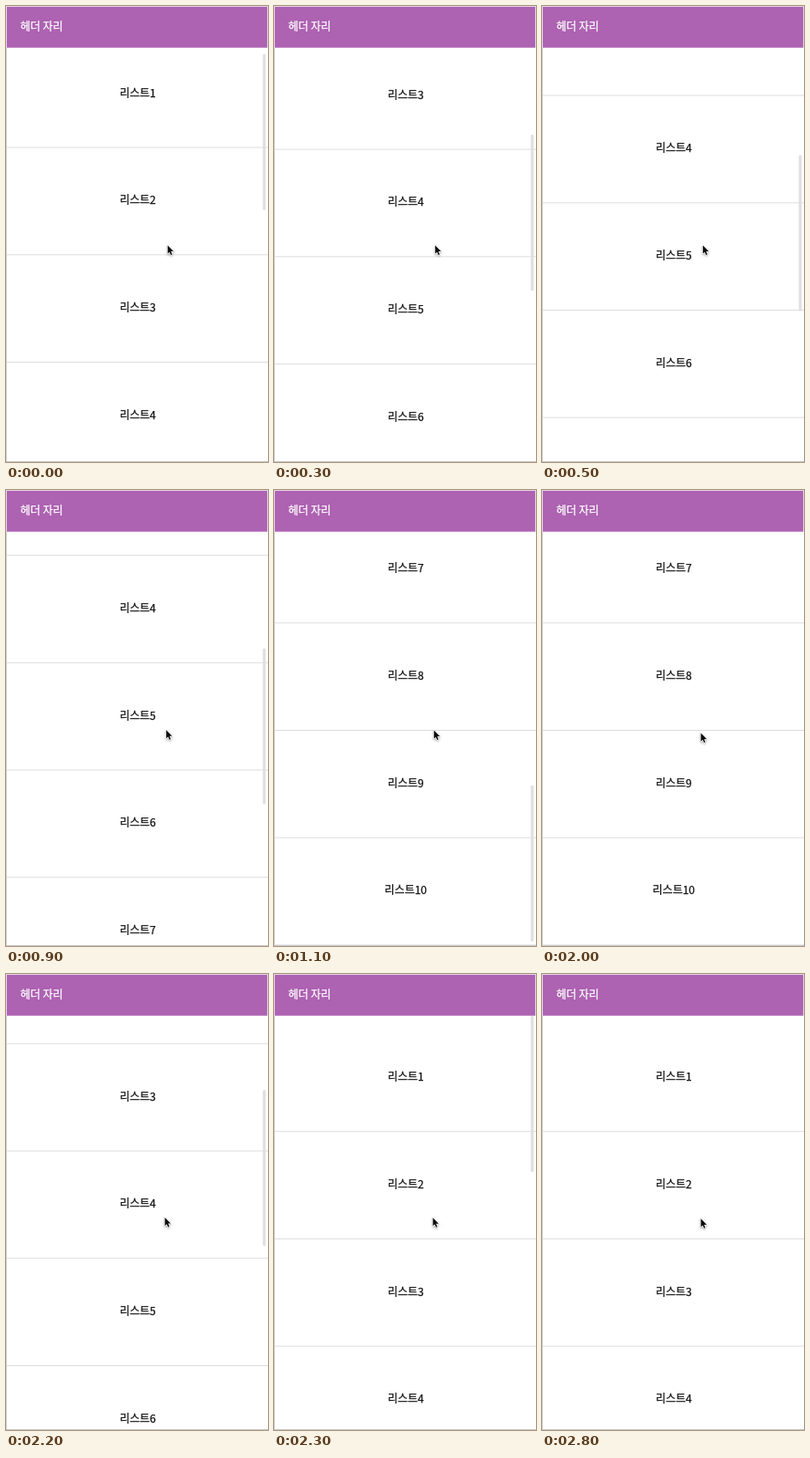
Animation of 288x500 px, one loop 4000 ms. Source, as an HTML page with a canvas:

```html
<!DOCTYPE html>
<html lang="ko">
<head>
<meta charset="utf-8">
<title>리스트 스크롤</title>
<style>
  html, body { margin: 0; width: 100%; height: 100%; overflow: hidden; background: #fff; }
  canvas { display: block; width: 288px; height: 500px; }
</style>
</head>
<body>
<canvas id="stage" width="288" height="500"></canvas>
<script>
const ctx = document.getElementById('stage').getContext('2d');
const LOOP = 4000, TICK = 100;
const WIDTH = 288, HEIGHT = 500, TOP = 46, ROW = 117.7, COUNT = 10;
const REST = 8.8, PAUSE = 304, END = 724.3;
const FONT = '500 12px "Noto Sans CJK KR", "Noto Sans CJK", "Noto Sans CJK JP", sans-serif';

// Fraction of the way from tick a to tick b.
const progress = (tick, a, b) => Math.min(1, Math.max(0, (tick - a) / (b - a)));
const glide = u => 1 - (1 - u ** 1.3) ** 3;

// A flick that glides out, a harder flick to the end, then a flick back up.
function scrollAt(tick) {
  return REST
    + (PAUSE - REST) * glide(progress(tick, 0, 6))
    + (END - PAUSE) * progress(tick, 7, 11) ** 4.15
    - END * progress(tick, 20, 23) ** 0.85
    - REST * progress(tick, 20, 23);
}

function barAlpha(tick) {
  return tick < 21 ? 1 - progress(tick, 15, 18) : 1 - progress(tick, 26, 28);
}

function cursorAt(tick) {
  return {
    x: 177.7 - 3.1 * progress(tick, 0, 18),
    y: 262.4 + 1.1 * progress(tick, 5, 11) + 3 * progress(tick, 13, 18)
      + 1.7 * progress(tick, 20, 28)
  };
}

function rect(color, x, y, w, h) {
  ctx.fillStyle = color;
  ctx.fillRect(x, y, w, h);
}

function text(label, x, y, color, align) {
  ctx.textAlign = align;
  ctx.fillStyle = ctx.strokeStyle = color;
  ctx.lineWidth = 0.25;
  ctx.fillText(label, x, y);
  ctx.strokeText(label, x, y);
}

function drawList(scroll) {
  for (let i = 0; i < COUNT; i++) {
    const y = TOP + i * ROW - scroll;
    rect('#dedede', 0, y + ROW - 0.3, WIDTH, 1);
    text('리스트' + (i + 1), 144.8, y + 62.4, '#111', 'center');
  }
}

function drawBar(scroll, alpha) {
  ctx.globalAlpha = alpha;
  ctx.fillStyle = '#dfdfdf';
  ctx.beginPath();
  ctx.roundRect(282.3, 49.2 + scroll * 0.379, 3.2, 171.3, 1.6);
  ctx.fill();
  ctx.globalAlpha = 1;
}

function drawHeader() {
  rect('#e6d5e8', 0, 0, WIDTH, TOP);
  rect('#ad62b2', 1, 1, WIDTH - 2, TOP - 1.4);
  text('헤더 자리', 15.7, 27.3, '#fff', 'left');
}

function drawCursor({ x, y }) {
  ctx.save();
  ctx.translate(x, y);
  ctx.scale(0.87, 0.87);
  ctx.beginPath();
  ctx.moveTo(0, 0);
  for (const [px, py] of [[0, 10.6], [2.4, 8.4], [4, 12.2], [5.7, 11.5], [4.1, 7.7], [7.4, 7.5]])
    ctx.lineTo(px, py);
  ctx.closePath();
  ctx.lineJoin = 'round';
  ctx.lineWidth = 1.4;
  ctx.strokeStyle = '#fff';
  ctx.shadowColor = 'rgba(0,0,0,0.4)';
  ctx.shadowBlur = 2.5;
  ctx.shadowOffsetY = 1;
  ctx.stroke();
  ctx.shadowColor = 'transparent';
  ctx.fillStyle = '#0c0c0c';
  ctx.fill();
  ctx.restore();
}

function draw(now) {
  const tick = Math.floor((now % LOOP) / TICK);
  const scroll = scrollAt(tick);
  ctx.font = FONT;
  rect('#fff', 0, 0, WIDTH, HEIGHT);
  drawList(scroll);
  drawBar(scroll, barAlpha(tick));
  rect('#d2d2d2', 0, TOP, 1, HEIGHT - TOP);
  rect('#cbcbcb', 0, HEIGHT - 1, WIDTH, 1);
  drawHeader();
  drawCursor(cursorAt(tick));
}

const start = performance.now();
function loop() {
  draw(performance.now() - start);
  requestAnimationFrame(loop);
}
loop();
</script>
</body>
</html>
```
